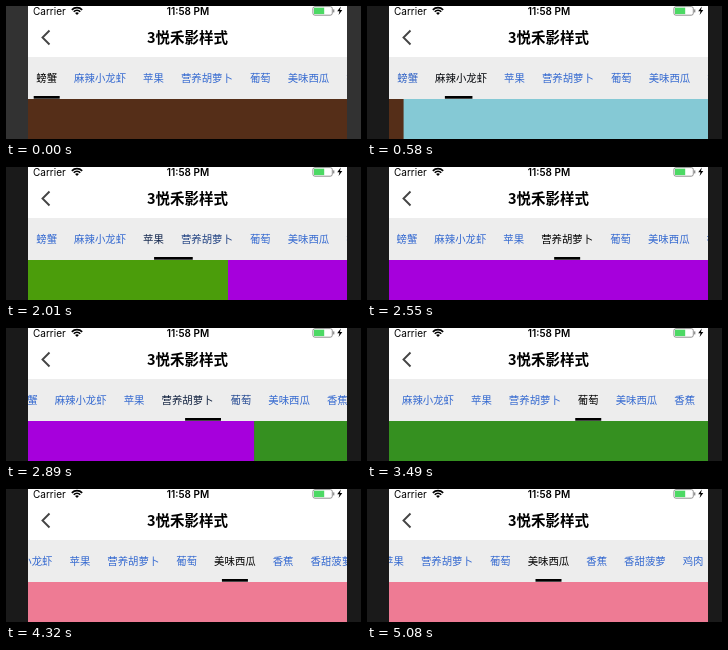
These frames come from a looping animation (355x133 px, 5.56 s). An HTML page with a canvas:

```html
<!DOCTYPE html>
<html lang="zh-CN">
<head>
<meta charset="utf-8">
<title>Tab bar</title>
<style>
html, body { margin: 0; width: 100%; height: 100%; overflow: hidden; background: #1a1a1a; }
canvas { display: block; width: 355px; height: 133px; }
</style>
</head>
<body>
<canvas id="stage"></canvas>
<script>
const W = 355, H = 133, LOOP = 5560, TICK = 59.2, TICK_SHIFT = 12;
const LEFT = 22, WIDTH = 319, MID = LEFT + WIDTH / 2;
const BAR_TOP = 51, PAGE_TOP = 93;
const CJK = '"Noto Sans CJK SC", "Noto Sans CJK", sans-serif';
const LATIN = 'Inter, "Liberation Sans", sans-serif';
const BLUE = [52, 105, 208];

const names = ['螃蟹', '麻辣小龙虾', '苹果', '营养胡萝卜', '葡萄', '美味西瓜', '香蕉', '香甜菠萝', '鸡肉'];
const pageColors = ['#552e18', '#85c9d5', '#4b9d0b', '#a600dc', '#359020', '#ee7b94'];
const GLYPH = 10.4, GAP = 17;

let nextX = 30.3;
const tabs = names.map(name => {
  const width = name.length * GLYPH;
  const tab = { name, x: nextX, center: nextX + width / 2 };
  nextX += width + GAP;
  return tab;
});

// Each swipe is dragged part of the way, held, then released to settle.
const swipes = [
  { drag: 0, hold: 160, part: 0.287, release: 340, settled: 700 },
  { drag: 945, hold: 1060, part: 0.257, release: 1240, settled: 1590 },
  { drag: 1835, hold: 2000, part: 0.373, release: 2195, settled: 2525 },
  { drag: 2780, hold: 2950, part: 0.455, release: 2950, settled: 3320 },
  { drag: 3715, hold: 3880, part: 0.45, release: 3880, settled: 4275 }
];
// Tab bar scrolls that bring the selected tab to the middle.
const scrolls = [
  { start: 2500, end: 2785, tab: 3 },
  { start: 3375, end: 3695, tab: 4 },
  { start: 4285, end: 4610, tab: 5 }
];

const canvas = document.getElementById('stage');
const ctx = canvas.getContext('2d');
const ratio = window.devicePixelRatio || 1;
canvas.width = W * ratio;
canvas.height = H * ratio;

const span = (t, a, b) => Math.min(1, Math.max(0, (t - a) / (b - a)));
const smooth = u => u * u * (3 - 2 * u);

function pagePosition(t) {
  return swipes.reduce((sum, s) => {
    const settle = 1 - Math.pow(1 - span(t, s.release, s.settled), 2.5);
    return sum + s.part * span(t, s.drag, s.hold) + (1 - s.part) * settle;
  }, 0);
}

function barScroll(t) {
  return scrolls.reduce((from, s) => {
    const to = tabs[s.tab].center - MID;
    return from + (to - from) * smooth(span(t, s.start, s.end));
  }, 0);
}

function rect(x, y, w, h, color) {
  ctx.fillStyle = color;
  ctx.fillRect(x, y, w, h);
}

function text(str, x, y, font, color, align = 'left') {
  ctx.font = font;
  ctx.fillStyle = color;
  ctx.textAlign = align;
  ctx.fillText(str, x, y);
}

function polyline(points, width, color) {
  ctx.beginPath();
  points.forEach(([x, y]) => ctx.lineTo(x, y));
  ctx.lineWidth = width;
  ctx.strokeStyle = color;
  ctx.stroke();
}

function drawWifi(x, y) {
  const a = -Math.PI * 0.75, b = -Math.PI * 0.25;
  ctx.strokeStyle = ctx.fillStyle = '#000';
  ctx.lineWidth = 1.7;
  for (const r of [4.6, 7.3]) {
    ctx.beginPath();
    ctx.arc(x, y, r, a, b);
    ctx.stroke();
  }
  ctx.beginPath();
  ctx.moveTo(x, y);
  ctx.arc(x, y, 2.7, a, b);
  ctx.fill();
}

function drawBattery() {
  ctx.strokeStyle = '#777';
  ctx.lineWidth = 0.8;
  ctx.beginPath();
  ctx.roundRect(306.9, 0.6, 19.4, 8.6, 2);
  ctx.stroke();
  rect(308, 1.7, 10.2, 6.4, '#4cd964');
  rect(327.2, 3.4, 1.1, 3, '#777');
  ctx.fillStyle = '#000';
  ctx.beginPath();
  [[334.8, 0.6], [331.2, 5.3], [333.5, 5.3], [332.6, 9], [336.3, 4.1], [334, 4.1]]
    .forEach(([x, y]) => ctx.lineTo(x, y));
  ctx.fill();
}

function drawHeader() {
  rect(LEFT, 0, WIDTH, BAR_TOP, '#fff');
  text('Carrier', 27, 8.6, `10px ${LATIN}`, '#000');
  drawWifi(71, 9);
  text('11:58 PM', 182, 8.6, `600 10px ${LATIN}`, '#000', 'center');
  drawBattery();
  polyline([[43.5, 24.5], [36.5, 31.5], [43.5, 38.5]], 1.9, '#444');
  text('3悦禾影样式', 181.5, 37, `bold 14.5px ${CJK}`, '#000', 'center');
}

function drawTabs(position, scroll) {
  rect(LEFT, BAR_TOP, WIDTH, PAGE_TOP - BAR_TOP, '#ededed');
  tabs.forEach((tab, i) => {
    const active = Math.max(0, 1 - Math.abs(i - position));
    const color = `rgb(${BLUE.map(c => Math.round(c * (1 - active))).join()})`;
    const weight = active > 0.8 ? 500 : 400;
    text(tab.name, tab.x - scroll, 75.7, `${weight} ${GLYPH}px ${CJK}`, color);
  });

  const i = Math.min(Math.floor(position), tabs.length - 2);
  const part = position - i;
  const center = tabs[i].center + (tabs[i + 1].center - tabs[i].center) * part - scroll;
  const width = 26 + 34 * Math.min(part, 1 - part);
  rect(center - width / 2, 90, width, 2.7, '#000');
}

function drawPages(position) {
  pageColors.forEach((color, i) => {
    const x = LEFT + (i - position) * WIDTH;
    if (Math.abs(i - position) < 1) rect(x, PAGE_TOP, WIDTH + 0.5, H - PAGE_TOP, color);
  });
}

function draw(time) {
  const t = Math.max(0, Math.floor((time + TICK_SHIFT + 3) / TICK) * TICK - TICK_SHIFT);
  const position = Math.min(pagePosition(t), pageColors.length - 1);
  const shade = Math.round(50 - 24 * span(t, 0, 160));

  ctx.setTransform(ratio, 0, 0, ratio, 0, 0);
  rect(0, 0, W, H, `rgb(${shade},${shade},${shade})`);
  ctx.save();
  ctx.beginPath();
  ctx.rect(LEFT, 0, WIDTH, H);
  ctx.clip();
  drawHeader();
  drawTabs(position, barScroll(t));
  drawPages(position);
  ctx.restore();
}

const start = performance.now();
function frame() {
  draw((performance.now() - start) % LOOP);
  requestAnimationFrame(frame);
}
frame();
</script>
</body>
</html>
```
